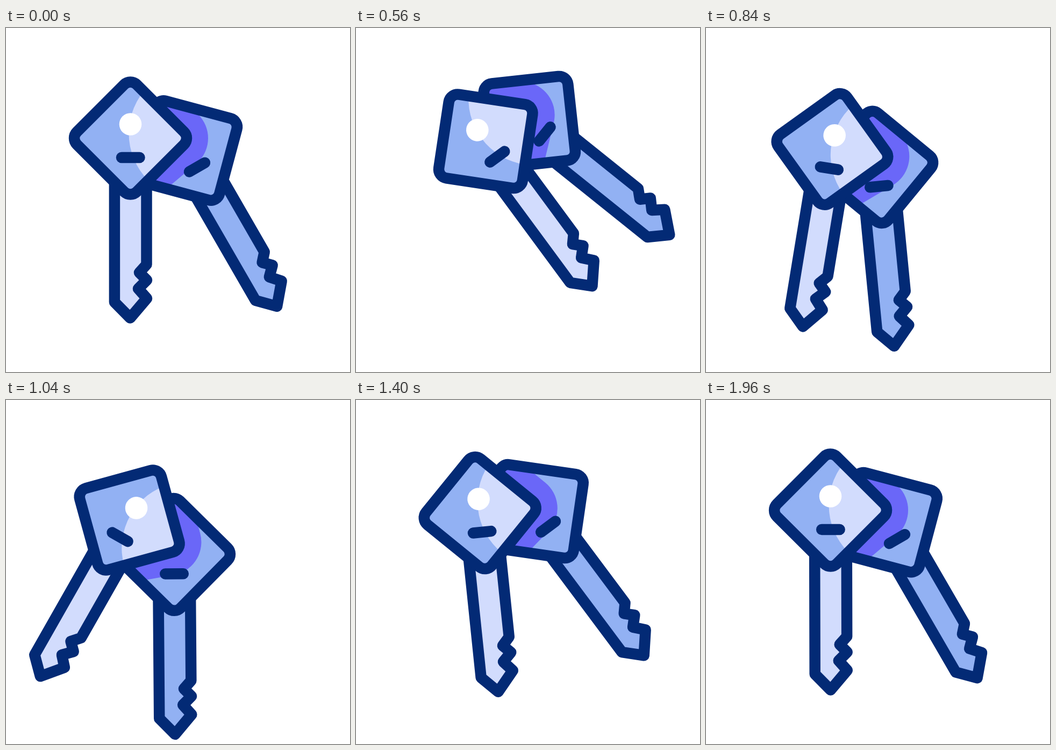
Animation of 640 by 640 pixels, one loop 2 s. Source, as an HTML page with a canvas:

```html
<!DOCTYPE html>
<html lang="en">
<head>
<meta charset="utf-8">
<title>Swinging keys</title>
<style>
html, body { margin: 0; width: 100%; height: 100%; overflow: hidden; background: #fff; }
canvas { display: block; width: 640px; height: 640px; }
</style>
</head>
<body>
<canvas id="stage"></canvas>
<script>
const LOOP = 2000, STEP = 40;
const NAVY = '#032a75', BLUE = '#92b1f3', PALE = '#d2dcfd', VIOLET = '#6a67f8';
const RAD = Math.PI / 180;

const canvas = document.getElementById('stage');
const ctx = canvas.getContext('2d');
const ratio = window.devicePixelRatio || 1;
canvas.width = canvas.height = 640 * ratio;

const ease = u => u * u * (3 - 2 * u);

// Eased swing from one turning point [time, value] to the next.
const sway = (...turns) => t => turns.reduce((value, [time, goal], i) => {
  if (i === 0) return goal;
  const since = turns[i - 1][0];
  const u = Math.min(1, Math.max(0, (t - since) / (time - since)));
  return value + (goal - turns[i - 1][1]) * ease(u);
}, 0);

// Front key: angle and place of its hole.
const swing = sway([60, 0], [600, -37], [985, 31], [1475, -8.4], [2000, 0]);
const holeX = sway([80, 231.5], [440, 223.5], [1000, 243], [1380, 228], [1720, 231.5]);
const holeY = sway([160, 179], [980, 201.5], [1590, 179]);

// Back key: angle and place as seen from the front key.
const lag = sway([280, -30], [700, -9.5], [1170, -34.8], [1560, -28.6], [2000, -30]);
const offX = sway([220, 105.8], [700, 82], [1190, 109.8], [1620, 99.5], [2000, 105.8]);
const offY = sway([80, 49], [480, 45.7], [800, 45.7], [1340, 33.5], [2000, 49]);

// Shapes, with the centre of the key head as origin.
const head = new Path2D();
const square = new Path2D();
square.roundRect(-78.7, -78.7, 157.4, 157.4, 16.5);
head.addPath(square, new DOMMatrix().rotate(45));

const blade = new Path2D('M-29.6 70V305L-.5 334.5L30.5 298L14.5 280L30.5 264L16.5 250L30 235V70');
const slot = new Path2D('M-16.5 36H17');

const disc = (x, y, r) => {
  const path = new Path2D();
  path.arc(x, y, r, 0, 2 * Math.PI);
  return path;
};
const glow = disc(121, -9, 124);
const hole = disc(0, -26, 20.8);

const shade = new Path2D();
shade.moveTo(0, -170);
shade.arc(82.5, 0, 62, -45 * RAD, 51 * RAD);
shade.lineTo(32.3, 123);
shade.lineTo(-60, 123);
shade.closePath();

function fill(path, color) {
  ctx.fillStyle = color;
  ctx.fill(path);
}

function place(pose) {
  ctx.setTransform(ratio, 0, 0, ratio, 0, 0);
  ctx.translate(pose.x, pose.y);
  ctx.rotate(pose.angle * RAD);
}

// The overlay sits inside the head and may follow another pose.
function drawKey(pose, bladeColor, overlay, overlayColor, overlayPose) {
  place(pose);
  fill(blade, bladeColor);
  ctx.stroke(blade);
  fill(head, BLUE);
  ctx.save();
  ctx.clip(head);
  place(overlayPose);
  fill(overlay, overlayColor);
  ctx.restore();
  ctx.stroke(head);
  ctx.stroke(slot);
}

// Point (x, y) turned by an angle and moved to an origin.
function turned(x, y, angle, ox, oy) {
  const c = Math.cos(angle * RAD), s = Math.sin(angle * RAD);
  return { x: ox + x * c - y * s, y: oy + x * s + y * c };
}

function draw(t) {
  const angle = swing(t), hx = holeX(t), hy = holeY(t);
  const front = { ...turned(0, 26, angle, hx, hy), angle };
  const back = { ...turned(offX(t), offY(t), angle, hx, hy), angle: angle + lag(t) };

  ctx.setTransform(ratio, 0, 0, ratio, 0, 0);
  ctx.fillStyle = '#fff';
  ctx.fillRect(0, 0, 640, 640);
  ctx.strokeStyle = NAVY;
  ctx.lineWidth = 20.5;
  ctx.lineCap = ctx.lineJoin = 'round';

  drawKey(back, BLUE, shade, VIOLET, front);
  drawKey(front, PALE, glow, PALE, front);
  fill(hole, '#fff');
}

const start = performance.now();
function frame() {
  const t = (performance.now() - start) % LOOP;
  draw(Math.floor(t / STEP) * STEP);
  requestAnimationFrame(frame);
}
frame();
</script>
</body>
</html>
```
